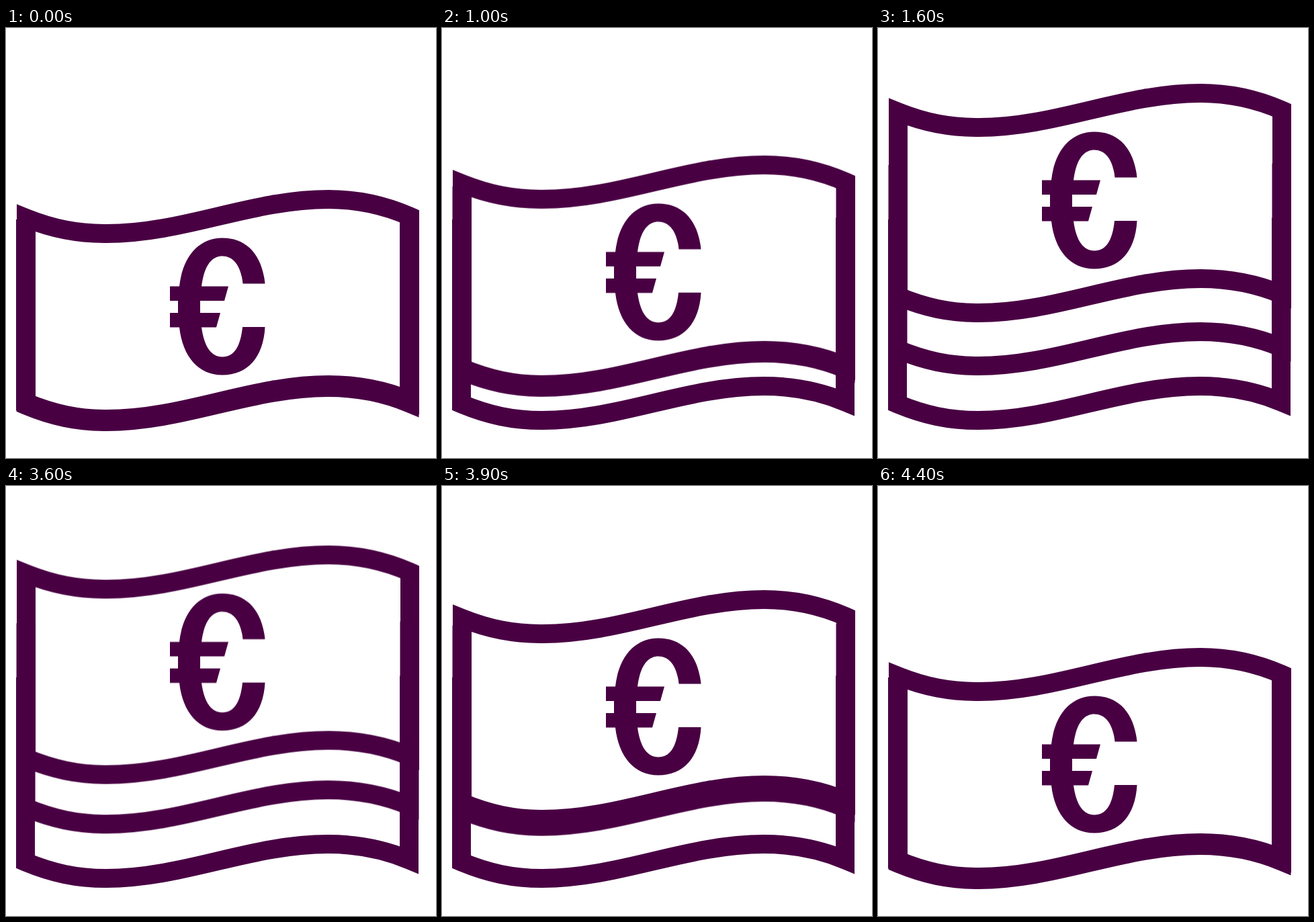
An HTML page without scripts that plays this animation: 640x640 px, repeating every 4.5 s.

```html
<!DOCTYPE html>
<html lang="en">
<head>
<meta charset="utf-8">
<title>Stack of notes</title>
<style>
  html, body { margin: 0; width: 100%; height: 100%; overflow: hidden; background: #fff; }
  svg { display: block; width: 100%; height: 100%; }
  .line { fill: none; stroke: #490043; stroke-width: 28; stroke-miterlimit: 10; }
  .euro { fill: #490043; }

  /* --k is the eased progress, --d the distance travelled */
  .lift, .spread { transform: translateY(0); animation: 4.5s step-end infinite; }
  .lift { --d: -79px; animation-name: lift; }
  .spread { animation-name: spread; }
  .top { --d: -79px; }
  .mid { --d: -4px; }

  /* the upper two notes rise together */
  @keyframes lift {
    0%, 97.77% { transform: translateY(0); }
    17.77% { transform: translateY(calc(var(--d) * .085)); }
    19.99% { transform: translateY(calc(var(--d) * .336)); }
    22.22% { transform: translateY(calc(var(--d) * .648)); }
    24.44% { transform: translateY(calc(var(--d) * .906)); }
    26.66% { transform: translateY(var(--d)); }
    88.88% { transform: translateY(calc(var(--d) * .996)); }
    91.11% { transform: translateY(calc(var(--d) * .823)); }
    93.33% { transform: translateY(calc(var(--d) * .49)); }
    95.55% { transform: translateY(calc(var(--d) * .167)); }
  }

  /* then the top note leaves the middle one */
  @keyframes spread {
    0%, 88.88% { transform: translateY(0); }
    26.66% { transform: translateY(calc(var(--d) * .01)); }
    28.88% { transform: translateY(calc(var(--d) * .215)); }
    31.11% { transform: translateY(calc(var(--d) * .544)); }
    33.33% { transform: translateY(calc(var(--d) * .86)); }
    35.55% { transform: translateY(var(--d)); }
    79.99% { transform: translateY(calc(var(--d) * .93)); }
    82.22% { transform: translateY(calc(var(--d) * .68)); }
    84.44% { transform: translateY(calc(var(--d) * .358)); }
    86.66% { transform: translateY(calc(var(--d) * .089)); }
  }
</style>
</head>
<body>
<svg viewBox="0 0 640 640" role="img" aria-label="Stack of euro notes">
  <defs>
    <path id="tray" class="line" d="M30 283V557.5C70 574 106 582 150 582C265 582 365 531 480 531C525 531 565 539.5 601 554.5V280.4"/>
  </defs>

  <use href="#tray" x="-1" y="2"/>

  <g class="lift">
    <g class="spread mid">
      <use href="#tray" x="-.5" y="4"/>
    </g>
    <g class="spread top">
      <path class="line" d="M30 283C70 299 106 306 150 306C265 306 365 255 480 255C525 255 565 264.5 601 280.4V554.5C565 539.5 525 531 480 531C365 531 265 582 150 582C106 582 70 574 30 557.5Z"/>
      <path class="euro" d="M385.5 380.5C381 336 357 312.5 322 312.5C287 312.5 263 340 258 384.5H244V406H256V424H244V445.5H258C263 490 287 516.5 322 516.5C359 516.5 383 491 385.5 445H352C349 475 339 489.5 322 489.5C306 489.5 295 475 291 445.5H313L319 424H289V406H325L331 384.5H291C295 354 306 339.5 322 339.5C339 339.5 350 355 352.500 380.5Z"/>
    </g>
  </g>
</svg>
</body>
</html>
```
